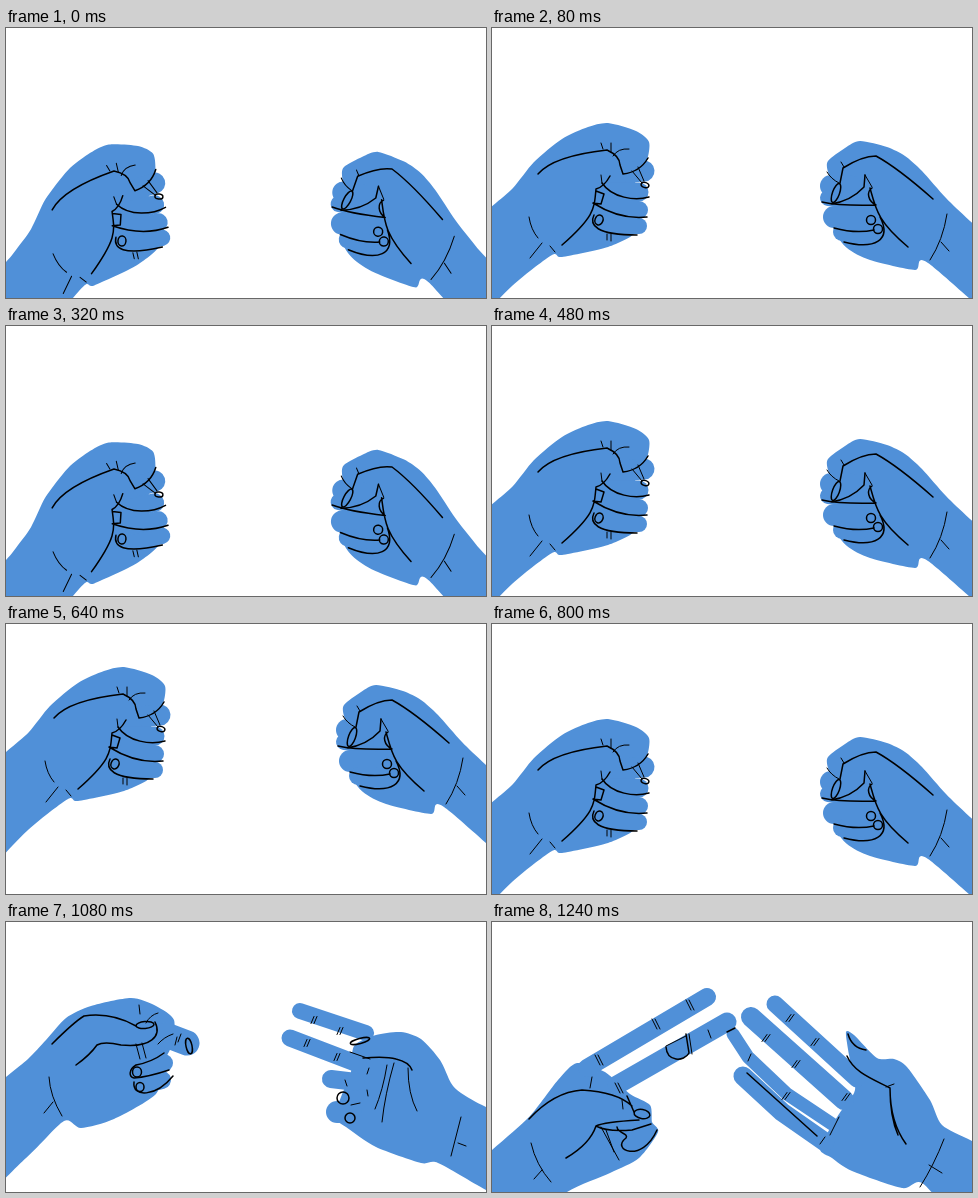
These frames come from a looping animation (480 by 270 pixels, 1400 ms). An HTML page:

```html
<!DOCTYPE html>
<html lang="en">
<head>
<meta charset="utf-8">
<title>Rock paper scissors</title>
<style>
  html, body { margin: 0; width: 100%; height: 100%; overflow: hidden; background: #fff; }
  svg { display: block; width: 100%; height: 100%; }
  path, ellipse, polyline { fill: none; stroke: #000; stroke-linecap: round; stroke-linejoin: round; }
  .palm { fill: #5090d8; stroke: none; }
  .finger { stroke: #5090d8; }
  .ink { stroke-width: 1.5; }
  .fine { stroke-width: 1; }
</style>
</head>
<body>
<svg id="stage" viewBox="0 0 480 270"></svg>
<script>
// A hand is a smooth palm, round-ended fingers [width, points], nails [x, y, rx, ry, angle],
// knuckle creases (pairs of short strokes) and ink lines.
const hands = {
  leftFist: {
    palm: `-60,180 0,128 23,108 44,82 72,59 98,47 118,43 146,51 159,62 157,80 146,100 140,130 146,152
           118,167 72,177 62,175 22,206 -60,282`,
    fingers: [[21, "140,92 154,91"], [19, "115,112 149,112"], [18, "115,130 149,130"], [16, "115,146 149,146"]],
    nails: [[109, 140, 4, 5, 20], [155, 105, 4, 2.5, 20]],
    ink: `M48,94C60,80 90,73 117,70Q130,76 130,85L133,94Q150,92 158,78 M112,103C122,118 145,121 159,117
          M120,96Q114,107 106,109C104,128 106,135 72,165 M106,111L114,114 111,124 103,123Q130,140 157,137
          M104,135C99,145 106,155 147,155`,
    fine: `M111,63L113,69 M121,63V72 M123,76Q128,68 139,69 M111,95L112,103 M142,91L152,103 M148,87L154,101
           M117,154V160 M121,154V161 M39,137Q41,150 48,158 M52,163L40,178 M60,166L65,172`
  },
  rightFist: {
    palm: `540,197 480,141 456,118 432,91 415,76 397,67 370,61 355,68 338,81 338,92 345,110 345,150 357,168
           380,180 425,190 438,183 540,266`,
    fingers: [[22, "341,106 360,106"], [16, "338,118 360,120"], [22, "344,137 365,137"], [18, "352,152 370,152"]],
    nails: [[346, 113, 3.5, 10, 20], [381, 140, 4.5, 4.5, 0], [388, 149, 4.5, 4.5, 0]],
    ink: `M353,88Q372,76 386,76Q408,88 443,119 M353,88L350,103 M341,124Q361,121 374,107L375,95
          M382,108C376,112 378,121 386,125 M380,108C386,130 388,142 418,167 M332,122Q350,126 386,125
          M344,148Q366,154 384,150 M354,162C385,170 402,160 390,137`,
    fine: `M337,92Q341,99 349,103 M351,82L354,87 M375,95L382,107 M457,134Q453,160 440,180 M451,162L459,171`
  },
  leftOpening: {
    palm: `-60,205 0,155 22,137 40,118 60,96 85,84 125,76 150,84 168,98 165,125 155,145 150,172 108,197
           75,206 58,199 20,236 -60,305`,
    fingers: [[25, "160,113 181,121"], [18, "140,141 158,141"], [18, "140,162 156,158"]],
    nails: [[131, 150, 4.5, 5, 0], [134, 165, 4, 4.5, 0], [183, 124, 3, 8, -12], [139, 103, 9, 3.5, -5]],
    ink: `M46,122Q68,100 78,94Q105,90 130,104 M70,143Q84,133 91,123Q98,119 115,123C145,126 156,114 149,100
          M158,131Q146,140 130,143C122,148 123,155 128,156Q142,155 163,148 M128,160C126,176 150,175 167,154`,
    fine: `M133,83L134,92 M140,101Q144,93 152,91 M136,121L140,136 M130,122L134,137 M152,122Q158,115 167,112
           M171,115L169,123 M175,112L172,120 M43,155Q44,174 56,194 M47,180L38,191`
  },
  rightOpening: {
    palm: `540,211 480,185 455,171 445,161 434,138 415,117 395,110 370,113 348,124 345,150 335,175 328,195
           340,205 370,225 415,241 432,241 480,268 540,300`,
    fingers: [[16, "294,89 360,111"], [17, "284,116 352,142"], [18, "325,157 350,160"], [22, "331,190 345,190"]],
    nails: [[354, 119, 10, 2.5, -15], [337, 176, 6, 6, 0], [344, 196, 5, 5, 0]],
    creases: { along: [-3, 7], at: "308,98 334,109 301,121 331,135" },
    ink: "M357,136Q380,134 390,137Q403,140 406,148",
    fine: `M344,130L364,137 M381,143Q377,168 369,187 M388,141Q379,172 376,200 M402,146Q402,172 411,189
           M363,146L361,152 M361,168L362,174 M339,158L341,164 M345,183L354,181 M455,195L445,234 M452,221L460,224`
  },
  leftOpen: {
    palm: `-60,280 0,228 38,194 66,158 85,141 113,150 138,172 158,183 160,200 166,210 147,236 118,251
           75,270 20,310 -60,330`,
    fingers: [[18, "215,75 95,146"], [19, "235,100 125,163"]],
    nails: [[150, 192, 8, 4.5, 10]],
    creases: { along: [5, 10], at: "107,138 127,166 164,102 198,83" },
    ink: `M37,197Q62,170 90,168Q125,170 140,184 M135,174L142,190 M74,236Q98,222 104,204Q112,200 147,198
          M104,204Q115,210 140,208L159,202 M125,205C126,212 137,211 134,216C118,228 150,242 165,208
          M174,125C175,140 192,140 197,131L194,112`,
    fine: `M109,205L127,238 M114,208L122,230 M100,155L98,166 M174,124L194,114 M197,112L200,132 M216,108L219,116
           M130,178L131,187 M39,221Q44,243 59,260 M50,248L42,257`
  },
  rightOpen: {
    palm: `540,250 480,219 450,203 438,178 415,145 402,137 385,136 362,113 354,110 357,133 363,168 347,192
           328,226 340,236 360,249 410,266 430,261 470,300 540,320`,
    fingers: [[17, "283,82 365,157"], [20, "259,95 352,178"], [13, "241,112 256,135 295,172 340,202"],
              [19, "251,154 290,190 333,220"]],
    nails: [],
    creases: { along: [-5, 7], at: "298,96 323,120 274,116 304,142 294,174 354,175" },
    ink: `M355,134C362,150 378,156 398,166Q398,200 414,222 M398,166Q398,195 406,213 M356,112Q360,126 374,128
          M255,151L325,214 M235,110L243,106`,
    fine: `M259,132L256,139 M402,162L394,165 M347,195L338,213 M333,215L328,222 M452,217Q442,243 428,265
           M437,243L450,251`
  }
};

const points = text => text.trim().split(/\s+/).map(p => p.split(",").map(Number));

// Closed Catmull-Rom curve through the listed points.
function smooth(text) {
  const pts = points(text);
  const at = i => pts[(i + pts.length) % pts.length];
  const handle = (p, a, b) => p.map((v, k) => v + (b[k] - a[k]) / 8);
  return "M" + pts[0] + pts.map((p, i) => {
    const next = at(i + 1);
    return "C" + [handle(p, at(i - 1), next), handle(next, at(i + 2), p), next].join(" ");
  }).join("") + "Z";
}

const path = (kind, d) => `<path class="${kind}" d="${d}"/>`;
const finger = ([width, line]) => `<polyline class="finger" stroke-width="${width}" points="${line}"/>`;
const nail = ([x, y, rx, ry, angle]) =>
  `<ellipse class="ink" rx="${rx}" ry="${ry}" transform="translate(${x} ${y}) rotate(${angle})"/>`;
const creaseLines = ({ along: [dx, dy], at }) => points(at).map(([x, y]) =>
  [-1.5, 1.5].map(gap => `M${x + gap - dx / 2},${y - dy / 2}l${dx},${dy}`).join("")).join("");

const stage = document.getElementById("stage");
stage.innerHTML = Object.entries(hands).map(([name, hand]) => `<g id="${name}">` +
  path("palm", smooth(hand.palm)) + hand.fingers.map(finger).join("") + hand.nails.map(nail).join("") +
  path("ink", hand.ink) + path("fine", hand.fine + (hand.creases ? creaseLines(hand.creases) : "")) + "</g>"
).join("");

function show(pose, leftMove, rightMove = leftMove) {
  for (const hand of stage.children) hand.setAttribute("display", "none");
  for (const [side, move] of [["left", leftMove], ["right", rightMove]]) {
    const hand = document.getElementById(side + pose);
    hand.setAttribute("display", "inline");
    hand.setAttribute("transform", move);
  }
}

const loop = 1400;
const stepTimes = [0, 80, 160, 240, 320, 480, 560, 640, 720, 800, 880, 960, 1080, 1160, 1200, 1240];

// Three shakes of four steps (drop, then rise), followed by the throw.
function draw(time) {
  const step = stepTimes.findLastIndex(t => t <= time);
  const phase = step % 4;
  const drop = 3 - phase;
  if (step > 12) show("Open", `translate(0 ${-8 * drop})`);
  else if (step === 12) show("Opening", "");
  else if (phase === 0) show("Fist", "translate(-9 73) rotate(-13 117 70)", "translate(0 65) rotate(8 386 76)");
  else show("Fist", `translate(${-drop} ${26 * drop})`);
}

const start = performance.now();
function tick() {
  draw((performance.now() - start) % loop);
  requestAnimationFrame(tick);
}
tick();
</script>
</body>
</html>
```
